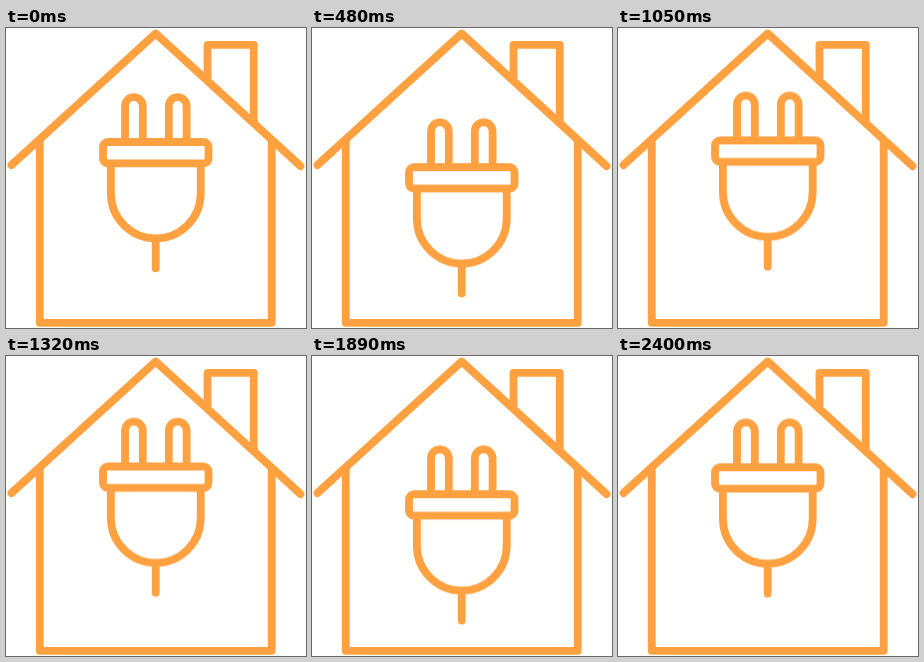
An HTML page for the animation above (2430 ms loop, 300x300 px).

```html
<!DOCTYPE html>
<html lang="en">
<head>
<meta charset="utf-8">
<title>House with plug</title>
<style>
  html, body { margin: 0; width: 100%; height: 100%; overflow: hidden; background: #fff; }
  svg { display: block; width: 100vw; height: 100vh; }
  path, rect { fill: none; stroke: #ffa140; stroke-width: 7.8; stroke-linecap: round; stroke-linejoin: round; }
</style>
</head>
<body>
<svg viewBox="0 0 300 300">
  <g>
    <path d="M5.5 137 L149.7 5.5 L294.5 138"/>
    <path d="M201.5 50 V16.8 H247.8 V93"/>
    <path d="M33.8 113 V294.8 H265.7 V113"/>
  </g>
  <g id="plug">
    <path d="M119 113 V78 a8.9 8.9 0 0 1 17.8 0 V113"/>
    <path d="M162.8 113 V78 a8.9 8.9 0 0 1 17.8 0 V113"/>
    <rect x="97" y="114" width="105.5" height="21.4" rx="5"/>
    <path d="M104.9 136 V165.4 a44.9 44.9 0 0 0 89.8 0 V136"/>
    <path d="M149.7 211 V240.3"/>
  </g>
</svg>
<script>
  const LOOP = 2430;
  // [time in ms, vertical shift]
  const steps = [[0, 0], [600, 28], [1200, -7], [1800, 26], [2400, -2.7], [LOOP, -2.7]];
  const keyframes = steps.map(([time, y]) => ({
    offset: time / LOOP,
    transform: `translate(0px, ${y}px)`,
    easing: 'cubic-bezier(.333, 0, .667, 1)'
  }));
  document.getElementById('plug').animate(keyframes, { duration: LOOP, iterations: Infinity });
</script>
</body>
</html>
```
